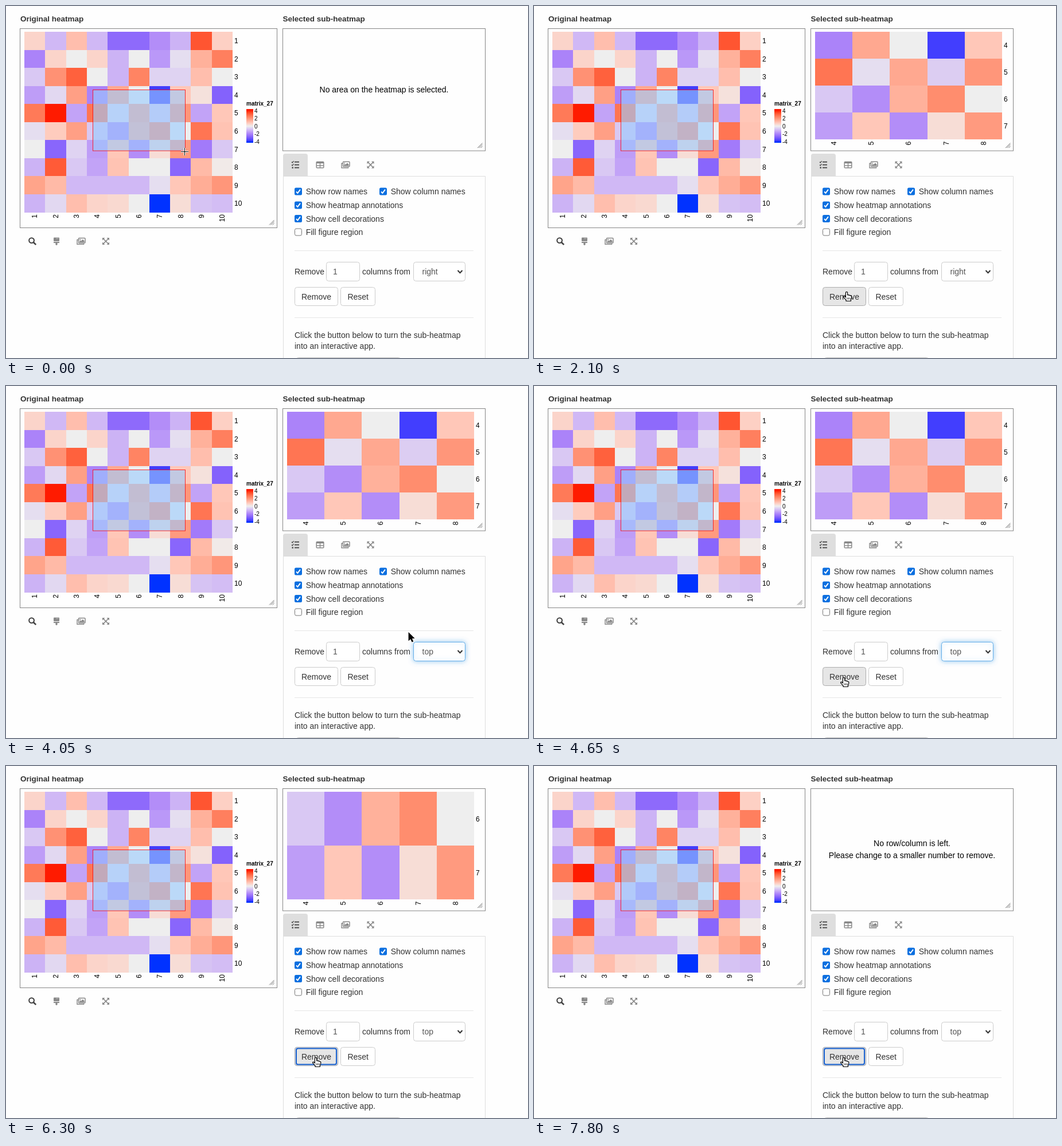
These frames come from a looping animation (910 px wide and 615 px high, 8 s). An HTML page with a canvas:

```html
<!DOCTYPE html>
<html lang="en">
<head>
<meta charset="utf-8">
<title>Interactive heatmap</title>
<style>
html, body { margin: 0; width: 100%; height: 100%; overflow: hidden; background: #fefefe; }
canvas { display: block; }
</style>
</head>
<body>
<canvas id="stage" width="910" height="615"></canvas>
<script>
const ctx = document.getElementById('stage').getContext('2d');
const LOOP = 8000, STEP = 150;
const SANS = '"Liberation Sans", Arial, sans-serif';

// Matrix values in tenths, row by row.
const MATRIX = [
  [6, -10, 11, -10, -26, -26, -18, -11, 33, 7],
  [-20, 6, 0, 6, -11, 0, -16, -3, 14, 25],
  [-7, 21, 31, 0, -11, 24, -5, -5, 11, 0],
  [-15, -4, 18, -20, 16, 0, -37, 9, 3, -28],
  [26, 40, -14, 27, -3, 16, -6, 20, -14, 9],
  [-3, 8, 18, -7, -18, 14, 22, 0, 27, 10],
  [0, -27, -5, -15, 9, -18, 4, 19, -22, -7],
  [-11, 32, -7, -14, 10, 0, 0, -27, 12, 1],
  [17, 12, -10, -10, -10, -10, -3, 9, 15, 20],
  [-11, -4, 11, 6, 5, 0, -40, 4, -8, -9]
];

// Lab colours at -40, -20, 0, 20, 40.
const STOPS = [[37, 65, -100], [63, 40, -54], [94.1, 0, 0], [73.6, 40, 33.6], [54.3, 78, 68.5]];

const mix = (a, b, k) => a + (b - a) * k;

function ramp(v) {
  const pos = (Math.max(-40, Math.min(40, v)) + 40) / 20;
  const i = Math.min(3, Math.floor(pos));
  const [L, a, b] = STOPS[i].map((c, n) => mix(c, STOPS[i + 1][n], pos - i));
  const fy = (L + 16) / 116;
  const inv = f => f > 0.2069 ? f ** 3 : (f - 16 / 116) / 7.787;
  const X = 0.9505 * inv(fy + a / 500), Y = inv(fy), Z = 1.089 * inv(fy - b / 200);
  const gamma = c => {
    c = Math.max(0, Math.min(1, c));
    return Math.round(255 * (c > 0.0031 ? 1.055 * c ** (1 / 2.4) - 0.055 : 12.92 * c));
  };
  return `rgb(${gamma(3.2406 * X - 1.5372 * Y - 0.4986 * Z)},` +
    `${gamma(-0.9689 * X + 1.8758 * Y + 0.0415 * Z)},` +
    `${gamma(0.0557 * X - 0.204 * Y + 1.057 * Z)})`;
}

function text(s, x, y, { size = 14, color = '#333', weight = '', align = 'left' } = {}) {
  ctx.font = `${weight} ${size}px ${SANS}`;
  ctx.textAlign = align;
  ctx.fillStyle = color;
  ctx.fillText(s, x, y);
}

function box(x, y, w, h, r, fill, stroke, width = 1) {
  ctx.beginPath();
  ctx.roundRect(x, y, w, h, r);
  if (fill) { ctx.fillStyle = fill; ctx.fill(); }
  if (stroke) { ctx.strokeStyle = stroke; ctx.lineWidth = width; ctx.stroke(); }
}

function rect(x, y, w, h, fill) {
  ctx.fillStyle = fill;
  ctx.fillRect(x, y, w, h);
}

function path(points, color, width, close) {
  ctx.beginPath();
  points.forEach(([x, y]) => ctx.lineTo(x, y));
  if (close) ctx.closePath();
  ctx.strokeStyle = color;
  ctx.lineWidth = width;
  ctx.stroke();
}

function at(x, y, draw) {
  ctx.save();
  ctx.translate(x, y);
  draw();
  ctx.restore();
}

function heatmap(x, y, w, h, rows, cols, labelY) {
  const cw = w / cols.length, rh = h / rows.length;
  const edge = (start, size, i) => Math.round(start + size * i);
  rows.forEach((r, i) => {
    const top = edge(y, rh, i);
    cols.forEach((c, j) => {
      const left = edge(x, cw, j);
      rect(left, top, edge(x, cw, j + 1) - left, edge(y, rh, i + 1) - top, ramp(MATRIX[r - 1][c - 1]));
    });
    text(r, x + w + 3, y + rh * (i + 0.5) + 4.5, { size: 12, color: '#000' });
  });
  cols.forEach((c, j) => at(x + cw * (j + 0.5) + 4.3, labelY, () => {
    ctx.rotate(-Math.PI / 2);
    text(c, 0, 0, { size: 12, color: '#000', align: 'right' });
  }));
}

const range = (a, b) => Array.from({ length: b - a + 1 }, (_, i) => a + i);

function frame(x, y, w, h) {
  ctx.strokeStyle = '#858585';
  ctx.lineWidth = 1;
  ctx.strokeRect(x, y, w, h);
  for (const d of [3, 6, 8.5]) {
    path([[x + w - 5 - d, y + h - 5], [x + w - 5, y + h - 5 - d]], '#777', 1);
  }
}

function legend() {
  text('matrix_27', 419, 174, { size: 10, color: '#000', weight: 'bold' });
  for (let y = 180; y < 239; y++) rect(419, y, 12, 1, ramp((209.5 - y) / 27 * 40));
  range(0, 4).forEach(i => text(4 - 2 * i, 433, 186.5 + 13.6 * i, { size: 10, color: '#000' }));
}

const icons = {
  search() {
    ctx.beginPath();
    ctx.arc(-1.4, -1.4, 4.4, 0, 7);
    ctx.strokeStyle = '#444';
    ctx.lineWidth = 2.1;
    ctx.stroke();
    path([[2, 2], [6.2, 6.2]], '#444', 2.6);
  },
  brush() {
    box(-5, -6.5, 10, 6.5, 1, '#888');
    rect(-5, 1, 10, 2, '#888');
    box(-1.6, 2, 3.2, 5, 1.4, '#888');
    rect(0, -6.5, 1, 3, '#bbb');
    rect(2.2, -6.5, 1, 2.4, '#bbb');
  },
  images() {
    box(-4.5, -5.5, 11.5, 8.5, 1, null, '#888', 1.5);
    path([[-5, -2.5], [-7, -2.5], [-7, 5.2], [4.6, 5.2], [4.6, 4]], '#888', 1.4);
    ctx.fillStyle = '#888';
    ctx.beginPath();
    [[-3, 1.7], [-3, 0], [-1.3, -1.6], [0, -0.4], [3, -3.2], [5.6, -0.6], [5.6, 1.7]].forEach(p => ctx.lineTo(...p));
    ctx.fill();
    ctx.beginPath();
    ctx.arc(-1.8, -3, 1, 0, 7);
    ctx.fill();
  },
  expand() {
    path([[-4, -4], [4, 4]], '#888', 1.7);
    path([[-4, 4], [4, -4]], '#888', 1.7);
    ctx.fillStyle = '#888';
    for (const sx of [-1, 1]) for (const sy of [-1, 1]) {
      ctx.beginPath();
      [[6, 6], [6, 1.5], [1.5, 6]].forEach(([x, y]) => ctx.lineTo(x * sx, y * sy));
      ctx.fill();
    }
  },
  list() {
    for (const y of [-5, 0, 5]) {
      rect(-1.5, y - 0.9, 8, 1.8, '#444');
      if (y < 5) path([[-6.5, y], [-5.3, y + 1.3], [-2.9, y - 1.6]], '#444', 1.3);
      else rect(-6, y - 1.2, 2.4, 2.4, '#444');
    }
  },
  table() {
    box(-6.3, -5.3, 12.6, 10.6, 1, null, '#888', 1.5);
    rect(-6, -5.5, 12, 3, '#888');
    rect(-6, 0.6, 12, 1.4, '#888');
    rect(-0.7, -4, 1.4, 9, '#888');
  }
};

function checkbox(x, y, label, on) {
  if (on) {
    box(x, y - 6.5, 13, 13, 2.5, '#0b6fe0');
    path([[x + 3, y + 0.3], [x + 5.4, y + 3], [x + 10, y - 3.4]], '#fff', 1.9);
  } else {
    box(x + 0.5, y - 6, 12, 12, 2.5, '#fff', '#767676');
  }
  text(label, x + 19.7, y + 5);
}

const button = { x: 503.5, y: 491.5, w: 75, h: 32 };
const overButton = ([x, y]) => x > button.x && x < button.x + button.w && y > button.y && y < button.y + button.h;

function drawButton(t, hover) {
  const { x, y, w, h } = button;
  const pressed = (t >= 4950 && t < 5250) || (t >= 6600 && t < 6750);
  const focused = t >= 4950;
  box(x, y, w, h, 4, pressed ? '#d6d6d6' : hover ? '#e6e6e6' : '#fff', hover ? '#adadad' : '#ccc');
  if (focused) {
    box(x, y, w, h, 4, null, '#b4b8c0', 1.5);
    box(x + 2.5, y + 2, w - 5, h - 4, 3, null, '#1760cf', 2);
  }
  text('Remove', 541, 512.5, { align: 'center' });
}

function drawSelect(t) {
  const glow = t < 3450 || t >= 5100 ? 0 : t < 3600 || t >= 4950 ? 0.5 : 1;
  ctx.save();
  if (glow) {
    ctx.shadowColor = `rgba(102,175,233,${0.7 * glow})`;
    ctx.shadowBlur = 8;
  }
  box(710.5, 447.5, 90, 33, 4, '#fff', glow ? '#66afe9' : '#ccc');
  ctx.restore();
  text(t < 3450 ? 'right' : 'top', 725.5, 469, { color: '#555' });
  path([[787.5, 462], [791.5, 466.3], [795.5, 462]], '#333', 2);
}

function drawPopup(y) {
  ctx.save();
  ctx.shadowColor = 'rgba(0,0,0,.28)';
  ctx.shadowBlur = 14;
  ctx.shadowOffsetY = 4;
  box(698.5, 394.5, 93, 84, 5, '#f1f1f1', '#c4c4c4');
  ctx.restore();
  const active = Math.max(0, Math.min(3, Math.round((y - 408) / 18.7)));
  rect(699, 399 + 18.7 * active, 92, 18.5, '#4792f7');
  ['top', 'bottom', 'left', 'right'].forEach((s, i) => {
    const color = i === active ? '#fff' : '#444';
    text(s, 719.5, 413 + 18.7 * i, { size: 15, color });
    if (i === 3) path([[705.5, 464.5], [708.3, 468], [713, 459.5]], color, 1.7);
  });
}

// Pointer track: time, x, y.
const TRACK = [
  [150, 311, 254], [900, 501, 488], [1050, 501, 488], [1350, 600, 418], [1650, 717, 440],
  [1800, 717, 440], [2100, 545, 500], [2400, 733, 462], [2550, 733, 462], [2700, 757, 463.5],
  [3000, 757, 463.5], [3300, 742, 410], [3900, 742, 410], [4650, 540, 510]
];

function pointer(t) {
  const i = TRACK.findIndex(k => k[0] > t);
  if (i === 0) return TRACK[0].slice(1);
  if (i < 0) return TRACK[TRACK.length - 1].slice(1);
  const [a, b] = [TRACK[i - 1], TRACK[i]], k = (t - a[0]) / (b[0] - a[0]);
  return [mix(a[1], b[1], k), mix(a[2], b[2], k)];
}

function arrow() {
  ctx.lineJoin = 'round';
  path([[0, 0], [0, 15.5], [3.6, 12.2], [6, 17.6], [8.7, 16.4], [6.3, 11.2], [11, 11]], '#fff', 2, true);
  ctx.fillStyle = '#000';
  ctx.fill();
}

function cross() {
  for (const [color, width] of [['#fff', 3], ['#000', 1]]) {
    path([[-6, 0.5], [7, 0.5]], color, width);
    path([[0.5, -6], [0.5, 7]], color, width);
  }
}

function hand() {
  ctx.lineJoin = 'round';
  const shape = new Path2D('M-1.6 1Q-1.5-.6 0-.6Q1.5-.6 1.6 1V5Q3.4 4 4.3 5.6Q6 4.8 6.7 6.3Q9 6 8.8 8.6' +
    'Q8.8 11 7.4 13V15.5H-1V13.6L-5.4 8.6Q-5.4 6.6-3.4 7.4L-1.6 9Z');
  ctx.fillStyle = '#fff';
  ctx.fill(shape);
  ctx.strokeStyle = '#000';
  ctx.lineWidth = 1.2;
  ctx.stroke(shape);
  for (const x of [1, 3.5, 6]) path([[x, 9.5], [x, 12.7]], '#000', 0.9);
}

function leftSide() {
  text('Original heatmap', 25, 27, { size: 13.5, weight: 'bold' });
  frame(24.5, 39.5, 448, 348);
  heatmap(32, 45, 363, 315.5, range(1, 10), range(1, 10), 364);
  legend();
  ctx.globalAlpha = 0.6;
  rect(152, 147, 161, 106, '#9cf');
  ctx.globalAlpha = 0.8;
  ctx.strokeStyle = '#f00';
  ctx.lineWidth = 1;
  ctx.strokeRect(151.5, 146.5, 161, 106.5);
  ctx.globalAlpha = 1;
  ['search', 'brush', 'images', 'expand'].forEach((name, i) => at([46, 88, 131, 174][i], 411, icons[name]));
}

function subHeatmap(t) {
  text('Selected sub-heatmap', 482.5, 27, { size: 13.5, weight: 'bold' });
  frame(482.5, 39.5, 353, 213.5);
  const note = (s, y) => text(s, 659, y, { color: '#000', align: 'center' });
  if (t < 600) {
    note('No area on the heatmap is selected.', 151);
  } else if (t >= 7800) {
    note('No row/column is left.', 140);
    note('Please change to a smaller number to remove.', 161);
  } else {
    const first = 4 + [5550, 6300, 7050].filter(s => t >= s).length;
    heatmap(490, 45, 326, 188, range(first, 7), range(4, 8), 236.5);
  }
}

function panel(t, pos) {
  path([[483.5, 615], [483.5, 297.5], [835.5, 297.5], [835.5, 615]], '#ddd', 1);
  box(483, 258, 43, 40, [4, 4, 0, 0], '#dedede');
  ['list', 'table', 'images', 'expand'].forEach((name, i) => at([504.5, 547.5, 592, 635.5][i], 277.5, icons[name]));

  checkbox(503, 324, 'Show row names', true);
  checkbox(651, 324, 'Show column names', true);
  checkbox(503, 348, 'Show heatmap annotations', true);
  checkbox(503, 371.5, 'Show cell decorations', true);
  checkbox(503, 395, 'Fill figure region', false);
  rect(503, 427, 312, 1, '#e6e6e6');
  rect(503, 544, 312, 1, '#e6e6e6');

  text('Remove', 503, 469);
  box(558.5, 447.5, 58, 33, 4, '#fff', '#ccc');
  text('1', 570, 469, { color: '#555' });
  text('columns from', 621, 469);
  drawSelect(t);
  drawButton(t, overButton(pos));
  box(583.5, 491.5, 60, 32, 4, '#fff', '#ccc');
  text('Reset', 613.7, 512.5, { align: 'center' });
  text('Click the button below to turn the sub-heatmap', 503, 580);
  text('into an interactive app.', 503, 599);
  box(505.5, 614.5, 183, 33, 4, '#fff', '#bbb');
}

function render(time) {
  const t = Math.floor((time % LOOP) / STEP) * STEP;
  const pos = pointer(t);
  rect(0, 0, 910, 615, '#fefefe');
  leftSide();
  subHeatmap(t);
  panel(t, pos);
  if (t >= 2850 && t < 3450) drawPopup(pos[1]);
  at(...pos, t < 300 ? cross : overButton(pos) ? hand : arrow);
}

const start = performance.now();
function tick() {
  render(performance.now() - start);
  requestAnimationFrame(tick);
}
tick();
</script>
</body>
</html>
```
